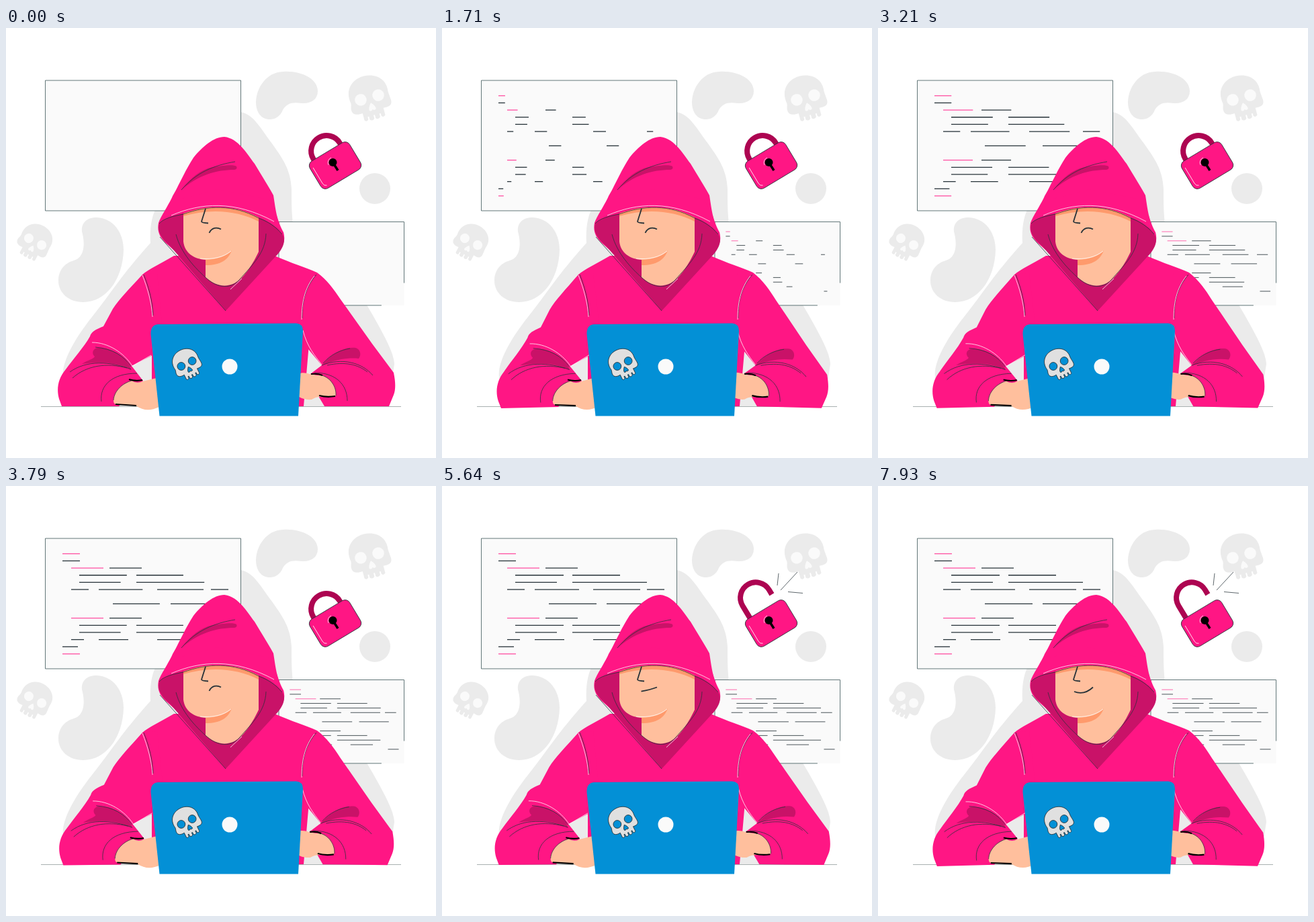
Animation, 640 px wide and 640 px high, one loop 8 s. Source, as an HTML page:

```html
<!DOCTYPE html>
<html lang="en">
<head>
<meta charset="utf-8">
<title>Hooded figure at a laptop</title>
<style>
html, body { margin: 0; width: 100%; height: 100%; overflow: hidden; background: #fff; }
svg { display: block; width: 100vw; height: 100vh; }
.grey { fill: #ebebeb; }
.pink { fill: #ff1684; }
.deep { fill: #c91268; }
.skin { fill: #ffbf9d; }
.shade { fill: #ff9a6c; }
.ink, .pale { fill: none; stroke-width: .75; stroke-linejoin: round; }
.ink { stroke: #263238; }
.pale { stroke: #fff; }
.cuff { fill: none; stroke: #000; stroke-width: 2.2; }
</style>
</head>
<body>
<svg viewBox="0 0 640 640">
  <defs>
    <path id="skull" d="M-29 1C-33-20-18-33 0-33C18-33 32-20 29-2C29 4 30 8 30 12C30 20 24 21 16 20V31q-3 4-6 0v-4h-2v5q-3.500 4-7 0v-5h-2v5q-3.500 4-7 0v-5h-2v4q-3 4-6 0V20C-24 21-31 19-31 11C-31 7-29 5-29 1Z"/>
    <g id="holes">
      <circle cx="-13.500" r="8.800"/><circle cx="13.500" r="8.800"/>
      <path d="M0 8C3 11 6 16 5 19Q2 21 0 18Q-2 21-5 19C-6 16-3 11 0 8Z"/>
    </g>
    <g id="greySkull"><use href="#skull" fill="#ebebeb"/><use href="#holes" fill="#fafafa"/></g>
    <g id="panel">
      <rect x="58.500" y="78" width="291" height="194" fill="#fafafa"/>
      <path d="M297 272H58.500V78H349.500V220" fill="none" stroke="#52686a" stroke-width=".9" vector-effect="non-scaling-stroke"/>
      <g id="code" stroke-width="1.300"></g>
    </g>
  </defs>

  <rect width="640" height="640" fill="#fff"/>
  <g class="grey">
    <path d="M349 125C368 128 378 148 396 172C410 192 424 210 425 240C425 265 425 275 428 300L530 400C550 435 578 480 578 500L575 520L558 563H102L85 520C82 500 100 465 128 430C160 390 170 370 215 320Q213 285 225 265Z"/>
    <path d="M372 110C373 88 388 66 412 65C440 63 464 76 464 94C464 106 454 113 440 112C426 110 418 112 412 122C408 132 400 136 393 136C380 136 372 126 372 110Z"/>
    <path d="M113 303C112 289 121 282 135 282C160 283 175 305 175 330C174 375 148 408 115 408C92 408 78 393 78 376C78 358 90 349 101 346C115 342 119 325 113 303Z"/>
    <circle cx="549" cy="239" r="23"/>
  </g>
  <use href="#greySkull" transform="translate(541 103.500) rotate(-15)"/>
  <use href="#greySkull" transform="translate(43.500 318) rotate(28) scale(.8)"/>

  <use href="#panel"/>
  <use href="#panel" transform="translate(368.500 238.500) scale(.641)"/>

  <g transform="translate(490 204.500) rotate(-31)">
    <path id="shackle" d="M-23 0V-25A23 23 0 0 1 23-25V-17" fill="none" stroke="#ad0451" stroke-width="8"/>
    <rect class="pink" x="-34.500" y="-23.500" width="69" height="47" rx="8" stroke="#263238" stroke-width=".8"/>
    <path class="pale" d="M-30-14V13Q-30 18-26 19"/>
  </g>
  <path class="pale" d="M480 204A8 8 0 0 1 484 193"/>
  <circle cx="486.500" cy="200" r="6"/>
  <path d="M487 201L494 212" stroke="#000" stroke-width="3.500"/>
  <g id="rays" class="ink" stroke-dasharray="1 2">
    <path pathLength="1" d="M499 148L501 130"/>
    <path pathLength="1" d="M504 155L529 128"/>
    <path pathLength="1" d="M515 157.500L537 159.500"/>
  </g>

  <path d="M52 563.500H588" stroke="#a9b0b0"/>

  <path class="pink" d="M250 339C230 351 212 359 203 367L217 480V563H443L451 470L463 364C445 356 425 350 402 340Z"/>

  <g id="left">
    <path class="pink" d="M203 367C183 389 168 404 159 418Q152 431 145 444C133 449 127 452 125 459C116 475 99 494 89 508C77 522 75 538 79 552L83 563H168L204 525L187 503L218 487L232 440L225 365Z"/>
    <path class="deep" d="M113 500C122 494 130 493 132 489C126 483 130 475 140 476C163 478 180 491 187 509C165 497 140 496 113 500Z"/>
    <path class="ink" d="M95 512C120 494 155 496 186 508M99 521C120 502 150 498 180 506M133 475C158 477 176 488 186 504M142 556C139 532 158 514 195 514"/>
    <path class="pale" d="M128 468C152 468 175 483 188 503L216 487"/>
    <path class="skin" d="M160 554C161 539 175 528 187 525Q195 530 203 526L228 520V564C215 570 205 570 193 562L164 560Q160 560 160 554Z"/>
    <path class="cuff" d="M183 523Q193 526 203 524M163 560L194 562"/>
    <path class="ink" d="M160 554C161 539 175 528 187 525"/>
  </g>

  <g id="right">
    <path class="pink" d="M463 364C478 375 488 389 498 404L545 470L577 513C580 528 580 538 577 546L570 563H474L465 548L453 515L470 502L444 471L440 365Z"/>
    <path class="deep" d="M470 503C483 485 505 474 520 476C528 478 529 487 525 492C505 490 485 495 470 503Z"/>
    <path class="ink" d="M470 502C500 490 530 498 546 517M478 502C505 496 524 501 538 512M472 499C483 486 498 479 512 477M459 513C490 513 508 530 508 555"/>
    <path class="pale" d="M442 450C448 474 459 487 470 501"/>
    <path class="skin" d="M435 515C445 510 451 517 470 517C484 521 492 535 491 547C478 552 468 545 455 553C445 554 438 550 434 548Z"/>
    <path class="cuff" d="M454 515Q464 514 471 517M466 547Q477 550 490 548"/>
    <path class="ink" d="M470 517C484 521 492 535 491 547"/>
  </g>

  <path class="ink" d="M205 367C212 384 218 405 219 428M462 367C447 384 440 405 441 432"/>
  <path class="pale" d="M203 368C211 388 217 410 218 430M459 369C444 388 440 410 440 434"/>

  <path class="pink" d="M325 162C345 164 358 186 370 202C382 222 391 236 398 249C402 275 403 285 413 304C416 316 414 323 402 337L327 400L240 322C227 311 225 301 227 290C231 279 243 262 248 250C258 233 264 217 279 193C292 177 309 162 325 162Z"/>
  <path class="deep" d="M264 275C245 280 231 285 228 291C224 305 234 315 245 325L327 421L405 336C415 324 416 313 411 307C400 291 387 283 376 279Z"/>
  <path class="skin" d="M264 274V318C266 335 280 344 297 345V371C310 383 325 387 340 380C355 372 368 350 376 333V281C350 264 290 264 264 274Z"/>
  <path class="shade" d="M264 274C290 264 350 264 376 281V288C345 272 305 268 264 280ZM297 345C315 344 328 340 336 331C331 345 320 353 297 353Z"/>
  <path class="pink" d="M228 291C235 283 249 279 264 276C300 263 338 261 376 282C390 287 402 295 411 306L403 280L390 255L315 240L245 258Z"/>
  <path class="pale" d="M246 279C290 260 340 256 399 288M289 343C308 345 324 341 335 332M334 389L351 373"/>
  <path class="ink" d="M228 291C235 283 249 280 264 277C300 264 338 262 376 283C390 288 402 296 411 307M229 311L327 421M253 307C260 335 282 358 299 373C315 387 334 389 347 375C368 351 386 335 387 306"/>
  <path class="deep" d="M261 241C275 223 289 211 308 207C325 204 340 203 343 206Q345 210 340 211C313 211 286 219 261 241Z"/>
  <path class="ink" d="M261 241C283 215 310 204 341 199"/>
  <path class="ink" d="M297 269L291 288Q291 290 301 290.500" style="stroke-width:1.800"/>
  <path class="ink" id="mouth" style="stroke-width:1.800"/>

  <path d="M226 441L432 439.500Q442 440 442 451L435 577.500H228.500L215.500 456Q215 442 226 441Z" fill="#0390d6"/>
  <circle cx="333" cy="504" r="11.500" fill="#fafafa"/>
  <g transform="translate(269 499.500) rotate(-26) scale(.67)" stroke="#263238" stroke-width="1.200">
    <use href="#skull" fill="#e0e0e0"/><use href="#holes" fill="#0390d6"/>
  </g>
</svg>
<script>
const LOOP = 8000, SWAY = 4800, SWING = 1.8;
const $ = id => document.getElementById(id);

// words of each kind of code line: from, to, from, to ...
const kinds = {
  tag: [0, 26], name: [0, 26], blank: [],
  head: [13, 61, 70, 118],
  pair: [25, 97, 110, 181],
  wide: [25, 87, 110, 221],
  trio: [13, 39, 54, 120, 141, 211, 221, 247],
  call: [75, 146, 161, 231],
  tail: [13, 32, 54, 98, 141, 193],
  end: [0, 23, 228, 253]
};
const listing = 'tag name head pair wide trio blank call blank head pair wide tail end tag';

const mix = (a, b, k) => a + (b - a) * k;
function ease(t, from, to) {
  const u = Math.min(1, Math.max(0, (t - from) / (to - from)));
  return u * u * (3 - 2 * u);
}

// each word is a line that grows; longer words take longer
const words = [];
listing.split(' ').forEach((kind, row) => {
  const cols = kinds[kind];
  for (let i = 0; i < cols.length; i += 2) {
    const line = document.createElementNS('http://www.w3.org/2000/svg', 'line');
    const x = 84 + cols[i], y = 100.8 + 10.65 * row, length = cols[i + 1] - cols[i];
    const pink = i === 0 && (kind === 'tag' || kind === 'head');
    const attrs = { x1: x, y1: y, y2: y, stroke: pink ? '#ff4da0' : '#263238' };
    for (const name in attrs) line.setAttribute(name, attrs[name]);
    $('code').append(line);
    words.push({ line, x, length, start: 400 + 20 * row, stop: 3200 + 12 * length });
  }
});

const frown = [302.5, 305, 306, 297, 314, 296, 320, 299.5];
const smile = [292, 306, 302, 310, 312, 307, 320, 299.5];

function render(t) {
  const angle = SWING * (1 - Math.cos(2 * Math.PI * t / SWAY)) / 2;
  $('left').setAttribute('transform', `rotate(${-angle} 205 367)`);
  $('right').setAttribute('transform', `rotate(${angle} 460 363)`);

  for (const w of words) w.line.setAttribute('x2', w.x + w.length * ease(t, w.start, w.stop));

  $('shackle').setAttribute('transform', `translate(0 ${-19.5 * ease(t, 4400, 5400)})`);
  $('rays').setAttribute('stroke-dashoffset', 1.01 * (1 - ease(t, 4500, 5150)));

  const k = ease(t, 4000, 7000);
  const m = frown.map((v, i) => mix(v, smile[i], k));
  $('mouth').setAttribute('d', `M${m.slice(0, 2)}C${m.slice(2)}`);
}

const begin = performance.now();
function tick() {
  render((performance.now() - begin) % LOOP);
  requestAnimationFrame(tick);
}
tick();
</script>
</body>
</html>
```
